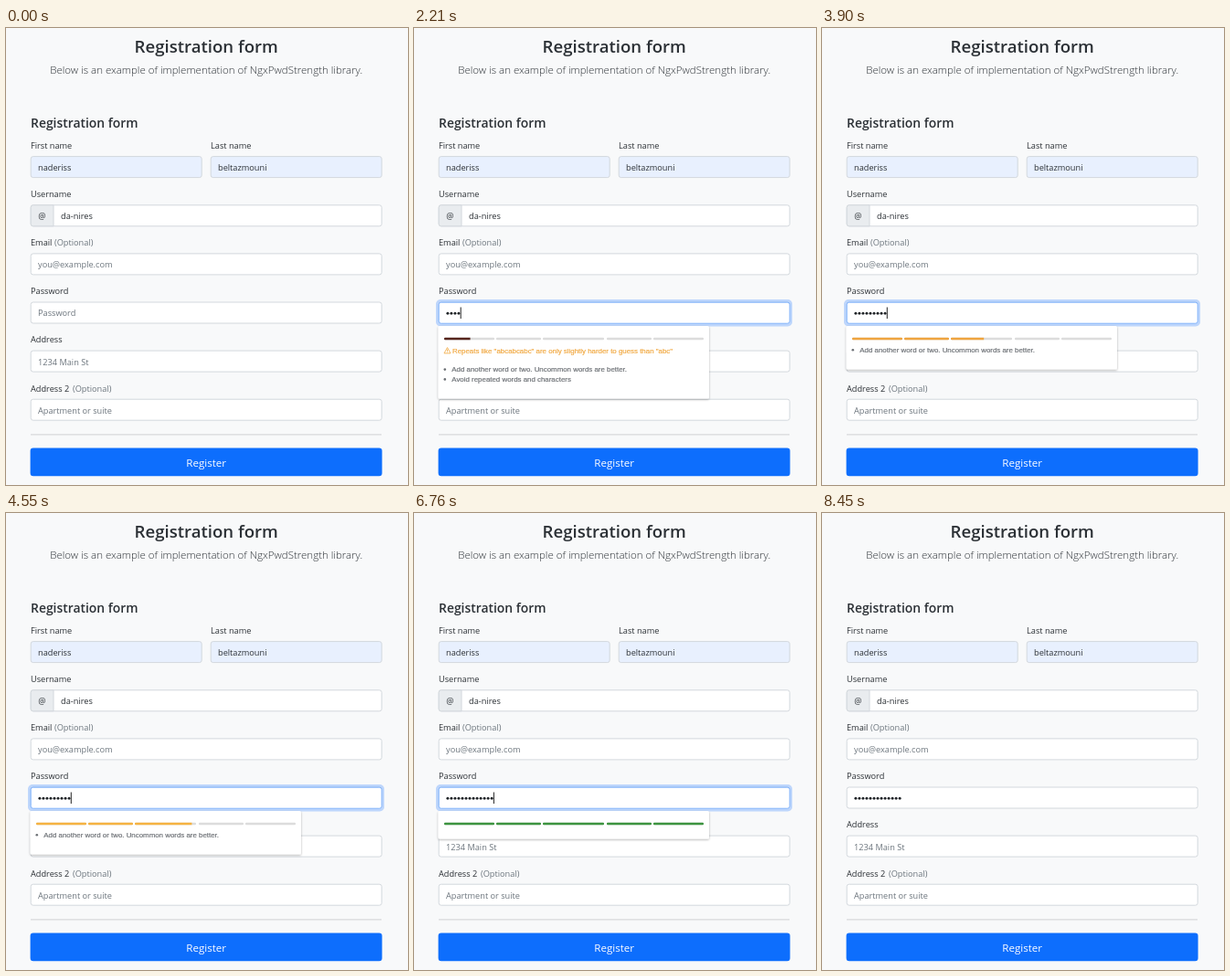
An HTML page that plays this animation: 440 by 500 pixels, repeating every 9.23 s.

```html
<!DOCTYPE html>
<html lang="en">
<head>
<meta charset="utf-8">
<title>Registration form</title>
<style>
  html, body { margin: 0; width: 100%; height: 100%; overflow: hidden; background: #f8f9fa; }
  svg { display: block; width: 100vw; height: 100vh; }
  text { font-family: "Open Sans", "Noto Sans", sans-serif; font-size: 9.2px; fill: #2b3035; }
  .title { font-size: 18.6px; font-weight: 600; }
  .lead { font-size: 11.5px; font-weight: 300; }
  .heading { font-size: 13.9px; font-weight: 600; }
  .muted { fill: #6c757d; }
  .button { font-size: 11.6px; fill: #fff; }
  .field { fill: #fff; stroke: #d3d8dd; }
  .field.auto { fill: #e8f0fe; }
  .hint text { font: 7.9px "Liberation Sans", Arial, sans-serif; fill: #6a6e73; stroke: #6a6e73; stroke-width: .18px; }
  .hint .warn { fill: #f0a63c; stroke: #f0a63c; }
</style>
</head>
<body>
<svg id="stage" viewBox="0 0 440 500" xmlns="http://www.w3.org/2000/svg">
  <defs>
    <clipPath id="segments"></clipPath>
    <filter id="shadow" x="-10%" y="-30%" width="120%" height="170%">
      <feDropShadow dx="0" dy="1" stdDeviation="1.2" flood-color="#000" flood-opacity=".32"/>
    </filter>
  </defs>
  <rect width="440" height="500" fill="#f8f9fa"/>
  <g id="form"></g>
  <g id="password">
    <g id="focus">
      <rect x="24" y="297" width="390" height="29.5" rx="5" fill="#0d6efd" fill-opacity=".25"/>
      <rect x="27.2" y="300.2" width="384" height="23" rx="2.5" fill="#fff" stroke="#86b7fe"/>
    </g>
    <text id="placeholder" class="muted" x="35" y="315.4">Password</text>
    <g id="dots" fill="#212529"></g>
    <rect id="caret" y="305.5" width="1" height="12.5" fill="#222"/>
  </g>
  <g id="popup" class="hint">
    <rect id="card" x="26.5" y="326" width="296.5" rx="1.5" fill="#fff" filter="url(#shadow)"/>
    <g clip-path="url(#segments)">
      <rect x="33" y="338" width="284" height="4" fill="#dcdcdc"/>
      <rect id="bar" x="33" y="338" height="4"/>
    </g>
    <g id="warning">
      <path d="M36.5 349.6 L40 355.9 H33 Z M36.5 351.7 V353.8 M36.5 354.5 V355.2" fill="none" stroke="#f0a63c" stroke-width=".8"/>
      <text class="warn" x="42" y="355.8">Repeats like "abcabcabc" are only slightly harder to guess than "abc"</text>
    </g>
    <g id="tipWords">
      <circle cx="33.8" cy="352.2" r="1.3" fill="#6a6e73"/>
      <text x="41.3" y="355">Add another word or two. Uncommon words are better.</text>
    </g>
    <g id="tipRepeats">
      <circle cx="33.8" cy="384.4" r="1.3" fill="#6a6e73"/>
      <text x="41.3" y="387.2">Avoid repeated words and characters</text>
    </g>
  </g>
</svg>
<script>
const LOOP = 9230, STEP = 130;
const FOCUS = 910, BLUR = 7800;
const $ = id => document.getElementById(id);

function add(parent, tag, attrs, content) {
  const el = document.createElementNS("http://www.w3.org/2000/svg", tag);
  for (const key in attrs) el.setAttribute(key, attrs[key]);
  if (content) el.textContent = content;
  return parent.appendChild(el);
}

const form = $("form");
const label = (x, y, content, cls = "") => add(form, "text", { x, y, class: cls }, content);
const centered = (y, content, cls) =>
  add(form, "text", { x: 219.2, y, class: cls, "text-anchor": "middle" }, content);
const field = (x, y, width, cls = "") =>
  add(form, "rect", { x: x + .2, y, width, height: 23, rx: 2.5, class: "field " + cls });

centered(27, "Registration form", "title");
centered(49.6, "Below is an example of implementation of NgxPwdStrength library.", "lead");
label(27, 108.6, "Registration form", "heading");

for (const [x, name, value] of [[27, "First name", "naderiss"], [224, "Last name", "beltazmouni"]]) {
  label(x, 131.8, name);
  field(x, 140.6, 187, "auto");
  label(x + 8, 156, value);
}

const rows = [
  ["Username"],
  ["Email", 53, "you@example.com"],
  ["Password"],
  ["Address", 0, "1234 Main St"],
  ["Address 2", 73, "Apartment or suite"]
];
rows.forEach(([name, optionalX, hint], i) => {
  const y = 193.8 + i * 53.1;
  label(27, y - 8.7, name);
  if (optionalX) label(optionalX, y - 8.7, "(Optional)", "muted");
  field(27, y, 384);
  if (hint) label(35, y + 15.4, hint, "muted");
});
add(form, "path", {
  d: "M52 193.8 V216.8 H29.7 a2.5 2.5 0 0 1 -2.5 -2.5 V196.3 a2.5 2.5 0 0 1 2.5 -2.5 Z",
  fill: "#e9ecef", stroke: "#d3d8dd"
});
label(35.2, 209, "@");
label(60, 209.2, "da-nires");

add(form, "rect", { x: 27, y: 444.4, width: 384, height: 1, fill: "#cfd1d3" });
add(form, "rect", { x: 26.6, y: 459.6, width: 385, height: 30.6, rx: 3.2, fill: "#0d6efd" });
centered(479.6, "Register", "button");

for (const [from, to] of [[33, 88], [90, 139], [141, 208], [211, 260], [262, 317]])
  add($("segments"), "rect", { x: from, y: 338.7, width: to - from, height: 2.6, rx: 1 });

// Time of each burst of typing and the password length it leads to
const typing = [
  [2080, 2], [2210, 4],
  [3250, 5], [3380, 6], [3640, 7], [3770, 8], [3900, 9],
  [4940, 10], [5200, 11], [5460, 12], [5720, 13]
];
// Start of each meter transition, its percentage and colour
const scores = [
  [2095, 20, [171, 74, 58]],
  [3305, 40, [232, 146, 60]],
  [3775, 60, [245, 179, 66]],
  [4945, 80, [155, 185, 74]],
  [5465, 100, [61, 148, 64]]
];
// Intervals in which the blinking caret is hidden
const blinks = [[1560, 2080], [2860, 3250], [6240, 6760], [7280, 7800]];

const dots = Array.from({ length: 13 }, (_, i) =>
  add($("dots"), "circle", { cx: 36.9 + 4.02 * i, cy: 312.2, r: 1.45 }));

const clamp = v => Math.max(0, Math.min(1, v));
const mix = (a, b, k) => a + (b - a) * k;
const show = (id, on) => $(id).setAttribute("display", on ? "inline" : "none");

function meter(t) {
  let percent = 0, color = [0, 0, 0];
  for (const [start, goal, tint] of scores) {
    const k = 1 - (1 - clamp((t - start) / 390)) ** 2;
    percent = mix(percent, goal, k);
    color = color.map((c, i) => mix(c, tint[i], k));
  }
  return { percent, color: `rgb(${color.map(Math.round)})` };
}

function render(time) {
  const t = Math.floor((time % LOOP) / STEP) * STEP;
  const between = (from, to) => t >= from && t < to;
  const focused = between(FOCUS, BLUR);
  const count = typing.reduce((n, [at, length]) => t >= at ? length : n, 0);

  const glow = Math.min(clamp((t - FOCUS) / 150), 1 - clamp((t - BLUR + 65) / 150));
  $("focus").setAttribute("opacity", glow);
  show("placeholder", count === 0);
  dots.forEach((dot, i) => dot.setAttribute("display", i < count ? "inline" : "none"));
  show("caret", focused && !blinks.some(([a, b]) => between(a, b)));
  $("caret").setAttribute("x", 34.6 + 4.02 * count);

  const warned = between(2080, 3770);
  const tipped = between(2080, 4940);
  show("popup", focused);
  show("warning", warned);
  show("tipWords", tipped);
  show("tipRepeats", warned);
  $("tipWords").setAttribute("transform", `translate(0 ${warned ? 21.4 : 0})`);
  const bottom = warned ? 405.5 : tipped ? 373.5 : count ? 356.5 : 353;
  $("card").setAttribute("height", bottom - 326);

  const { percent, color } = meter(t);
  $("bar").setAttribute("width", 2.84 * percent);
  $("bar").setAttribute("fill", color);
}

const origin = performance.now();
function tick() {
  render(performance.now() - origin);
  requestAnimationFrame(tick);
}
tick();
</script>
</body>
</html>
```
